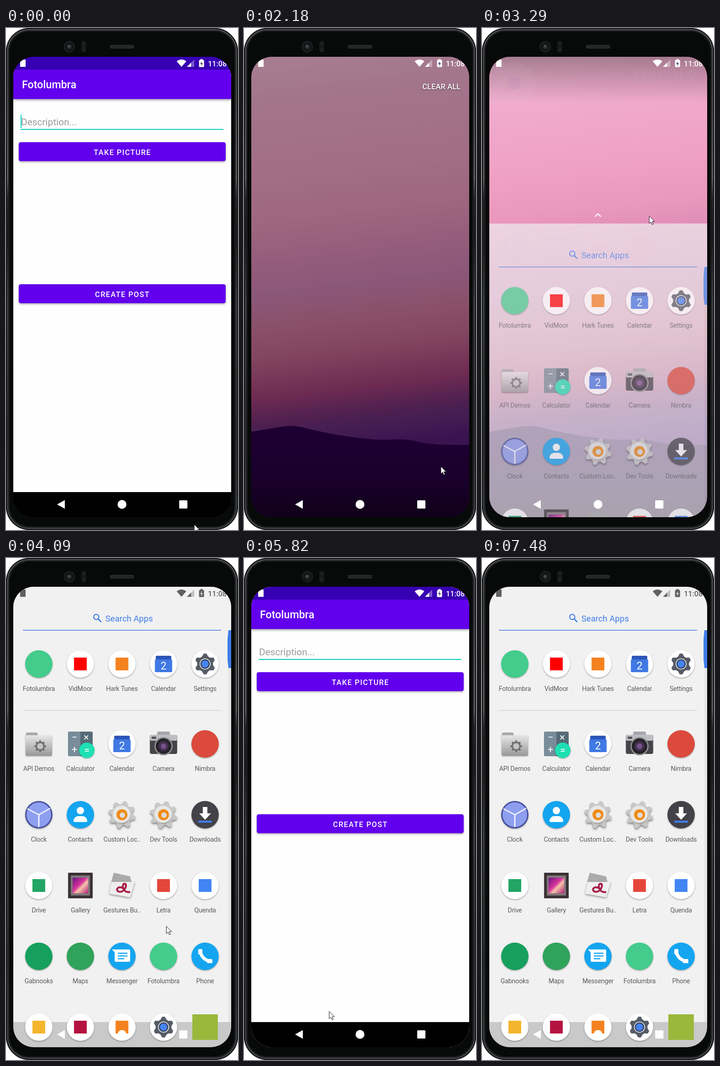
Recreate the animation shown at these times as an HTML page with a canvas. Size 509x1099 px, loop 7950 ms.

```html
<!DOCTYPE html>
<html lang="en">
<head>
<meta charset="utf-8">
<title>Phone walkthrough</title>
<style>
html, body { margin: 0; width: 100%; height: 100%; overflow: hidden; background: #fff; }
canvas { display: block; width: 509px; height: 1099px; }
</style>
</head>
<body>
<canvas id="stage" width="509" height="1099"></canvas>
<script>
const W = 509, H = 1099, LOOP = 7950, TAU = Math.PI * 2;
const APP = 'Fotolumbra';
const VIOLET = '#6200ee', BLUE = '#3f7de8', SKY = '#14a5f0', GREEN = '#43cc8c';
const REST = 831; // distance the app drawer travels

let g = document.getElementById('stage').getContext('2d');
const buffer = document.createElement('canvas');
buffer.width = W; buffer.height = H;
const bufferCtx = buffer.getContext('2d');

// ---- helpers ----
const ramp = (t, a, b) => Math.min(1, Math.max(0, (t - a) / (b - a)));
const ease = (t, a, b) => { const u = ramp(t, a, b); return u * u * (3 - 2 * u); };
const mix = (a, b, u) => a + (b - a) * u;

function track(t, keys, i = 1) {
  let n = 1;
  while (n < keys.length - 1 && t > keys[n][0]) n++;
  const a = keys[n - 1], b = keys[n];
  return mix(a[i], b[i], ramp(t, a[0], b[0]));
}
function rect(x, y, w, h, fill, r = 0) {
  g.fillStyle = fill;
  g.beginPath();
  g.roundRect(x, y, w, h, r);
  g.fill();
}
function disc(x, y, r, fill) {
  g.fillStyle = fill;
  g.beginPath();
  g.arc(x, y, r, 0, TAU);
  g.fill();
}
function line(points, color, width) {
  g.strokeStyle = color;
  g.lineWidth = width;
  g.beginPath();
  points.forEach(p => g.lineTo(...p));
  g.stroke();
}
function poly(points, fill) {
  g.fillStyle = fill;
  g.beginPath();
  points.forEach(p => g.lineTo(...p));
  g.closePath();
  g.fill();
}
function text(s, x, y, size, color, { weight = 400, align = 'left', space = 0 } = {}) {
  g.font = `${weight} ${size}px Roboto, sans-serif`;
  g.letterSpacing = space + 'px';
  g.textAlign = align;
  g.fillStyle = color;
  g.fillText(s, x, y);
}
function gradient(x0, y0, x1, y1, stops) {
  const fill = g.createLinearGradient(x0, y0, x1, y1);
  stops.forEach(([at, color]) => fill.addColorStop(at, color));
  return fill;
}
function at(x, y, draw) {
  g.save();
  g.translate(x, y);
  draw();
  g.restore();
}
function layer(alpha, draw) {
  if (alpha <= 0) return;
  if (alpha >= 1) return draw();
  const main = g;
  g = bufferCtx;
  g.clearRect(0, 0, W, H);
  draw();
  g = main;
  g.globalAlpha = alpha;
  g.drawImage(buffer, 0, 0);
  g.globalAlpha = 1;
}
function raised(dy, blur, alpha, draw) {
  g.save();
  g.shadowColor = `rgba(0,0,0,${alpha})`;
  g.shadowBlur = blur;
  g.shadowOffsetY = dy;
  draw();
  g.restore();
}

// ---- phone ----
function phone() {
  g.fillStyle = '#fff';
  g.fillRect(0, 0, W, H);
  rect(0, 0, W, H, '#080909', 51);
  const rim = gradient(0, 0, 0, H, [[0, '#626466'], [.1, '#55585a'], [.3, '#808284'],
    [.34, '#2a2c2d'], [.42, '#191b1c'], [.55, '#55585a'], [.8, '#34373a'], [1, '#55585a']]);
  [[1.5, 3, '#1b1d1e'], [3.8, 1.8, rim], [6.5, 2.5, '#1d1f20']].forEach(([d, w, color]) => {
    g.strokeStyle = color;
    g.lineWidth = w;
    g.beginPath();
    g.roundRect(d, d, W - 2 * d, H - 2 * d, 51 - d);
    g.stroke();
  });
  disc(139, 41, 12.5, '#1e1f20');
  disc(139, 41, 10, '#131415');
  disc(139, 41, 5, '#2c2e30');
  disc(138, 40, 2, '#5a5d60');
  rect(165, 28, 11, 26, '#171819', 5);
  disc(170.5, 34, 4, '#1e1f20');
  disc(170.5, 47, 4, '#1e1f20');
  rect(228, 37, 53, 8, '#2d2e2f', 4);
  for (let x = 232; x < 279; x += 3) rect(x, 38.5, 1.2, 5, '#161717');
}

function statusIcons(color) {
  poly([[34, 69], [43, 69], [43, 85], [31, 85], [31, 72]], color);
  g.fillStyle = color;
  g.beginPath();
  g.moveTo(385, 85);
  g.lineTo(374.5, 73);
  g.quadraticCurveTo(385, 65, 395.5, 73);
  g.fill();
  g.globalAlpha = .35;
  poly([[413, 69], [413, 85], [397, 85]], color);
  g.globalAlpha = 1;
  poly([[406, 76], [406, 85], [397, 85]], color);
  rect(423.5, 70, 11, 15.5, color, 1.5);
  rect(426.5, 68, 5, 3, color);
  poly([[430, 72], [426, 79], [429, 79], [428, 84], [432, 77], [429, 77]], color === '#fff' ? '#463070' : '#ddd');
  text('11:08', 443, 83.5, 16.3, color, { weight: 500 });
}

function navButtons() {
  poly([[112, 1043], [129, 1033.5], [129, 1052.5]], '#fff');
  disc(254.5, 1043, 9.7, '#fff');
  rect(380, 1034, 18, 18, '#fff', 1.5);
}

// ---- posting app ----
function button(label, y) {
  raised(2, 4, .35, () => rect(28, y, 454, 41.5, VIOLET, 4.5));
  text(label, 255.5, y + 27.5, 16.3, '#fff', { weight: 500, align: 'center', space: 1.45 });
}
function appBody(caret) {
  raised(2, 5, .35, () => rect(16, 91, 478, 64.5, VIOLET));
  text(APP, 35, 132, 23.3, '#fff', { weight: 500 });
  text('Description...', 33, 213, 20.9, '#9b9b9b');
  rect(32, 221, 445, 2, '#03d0bd');
  if (caret) rect(32, 190, 2, 29, '#03d0bd');
  button('TAKE PICTURE', 250);
  button('CREATE POST', 561);
}
function appWindow(bottom = 1016) {
  rect(16, 91, 478, bottom - 91, '#fefefe');
  rect(16, 63, 478, 28, '#3700b3');
}

// ---- wallpaper, home and recents ----
function wallpaper() {
  g.fillStyle = gradient(205, 70, 305, 913, [[0, '#f4b6d4'], [.08, '#f0acce'], [.27, '#efa1c4'],
    [.39, '#ea97bc'], [.5, '#da88b5'], [.58, '#cd80b2'], [.67, '#cb7599'], [.74, '#c0668d'],
    [.84, '#a34079'], [.91, '#742f76'], [.95, '#632b79'], [1, '#551d76']]);
  g.fillRect(16, 63, 478, 1008);
  const ridge = [[16, 884], [62, 876], [110, 869], [150, 880], [220, 894], [300, 903], [355, 899], [405, 912], [494, 913]];
  g.fillStyle = gradient(0, 870, 0, 1071, [[0, '#2c004a'], [.6, '#260040'], [1, '#170024']]);
  g.beginPath();
  g.moveTo(...ridge[0]);
  for (let i = 1; i < ridge.length - 1; i++) {
    const [x, y] = ridge[i], [nx, ny] = ridge[i + 1];
    g.quadraticCurveTo(x, y, (x + nx) / 2, (y + ny) / 2);
  }
  g.lineTo(494, 913);
  g.lineTo(494, 1071);
  g.lineTo(16, 1071);
  g.fill();
}

function home(top) {
  rect(16, 76, 101, 92, '#f4f4f4', [0, 46, 46, 0]);
  disc(71, 122, 14, BLUE);
  text('March 2', 474, 120, 40, '#fff', { align: 'right' });
  [phoneIcon, chatIcon, mark('#e5463a'), plain('#db4a3c')].forEach((icon, i) =>
    at(72 + 91.2 * i, top + 56, icon));
}

function card(k, header, dx) {
  const s = mix(1, .9226, k), top = mix(63, 91, k), bottom = mix(1016, 894, k);
  g.save();
  g.translate(19.3 * k + dx, 107 * k);
  g.scale(s, s);
  raised(4, 26, .55, () => rect(16, top, 478, bottom - top, '#fefefe'));
  g.beginPath();
  g.rect(16, top, 478, bottom - top);
  g.clip();
  appWindow();
  appBody(k === 0);
  g.restore();
  g.globalAlpha *= header;
  rect(34 + dx, 191, 441, 65, VIOLET);
  disc(69 + dx, 224, 15, GREEN);
  text(APP, 99 + dx, 231.5, 18.6, '#fff');
  g.globalAlpha = 1;
}

// ---- launcher icons, drawn around the origin ----
const plate = color => raised(1.5, 3, .35, () => disc(0, 0, 30, color));
const plain = color => () => plate(color);
const mark = color => () => { plate('#fff'); rect(-14, -14, 28, 28, color); };

function gear(r, teeth, color, hole) {
  g.fillStyle = color;
  g.beginPath();
  for (let i = 0; i < teeth * 4; i++) {
    const a = (i - .5) / (teeth * 4) * TAU, d = i % 4 < 2 ? r : r * .76;
    g.lineTo(Math.cos(a) * d, Math.sin(a) * d);
  }
  g.fill();
  disc(0, 0, r * .52, hole);
}
function settings() {
  plate('#fff');
  g.save();
  g.rotate(TAU / 12);
  gear(23, 6, '#555c66', '#fff');
  g.restore();
  disc(0, 0, 10.5, '#2e3c55');
  disc(0, 0, 8, '#4683f0');
}
function calendar() {
  plate('#fff');
  rect(-17, -18, 34, 12, '#2c55b8', 2);
  rect(-19, -10, 38, 28, '#4079e4', 2);
  text('2', 0, 11.5, 23, '#fff', { align: 'center' });
}
function folder() {
  raised(2, 3, .4, () => {
    rect(-28, -25, 25, 12, '#aaa', 3);
    rect(-29, -19, 58, 44, gradient(0, -19, 0, 25, [[0, '#e6e6e6'], [1, '#9a9a9a']]), 3);
  });
  at(3, 5, () => gear(13, 8, '#707070', '#c4c4c4'));
}
function calculator() {
  rect(-27, -27, 54, 54, '#566b77', 3);
  rect(-27, -27, 27, 54, '#788d99', [3, 0, 0, 3]);
  raised(1, 3, .4, () => disc(14, 14, 17, '#1fe0b3'));
  [['−', -13, -7], ['×', 13, -7], ['+', -13, 20], ['=', 14, 21]].forEach(([s, x, y]) =>
    text(s, x, y, 22, '#fff', { align: 'center' }));
}
function camera() {
  rect(-14, -27, 28, 14, '#a5a6aa', 3);
  rect(-30, -20, 60, 42, '#454549', 4);
  rect(-30, -20, 60, 13, '#bdbec1', 3);
  rect(-26, -16, 10, 5, '#555');
  [[20, '#8b8c90'], [17, '#252328'], [11, '#443050'], [6, '#77528a']].forEach(([r, c]) => disc(0, 5, r, c));
}
function clock() {
  plate('#46519f');
  disc(0, 0, 27, '#8f9ff0');
  [[-25, -13], [25, -14], [0, 27]].forEach(p => line([[0, 0], p], '#fff', 2.5));
}
function contacts() {
  plate(SKY);
  disc(0, -9, 8, '#fff');
  rect(-15, 3, 30, 13, '#fff', [11, 11, 2, 2]);
}
function tool() {
  g.save();
  g.rotate(.25);
  raised(3, 4, .45, () => gear(30, 8, '#c9c8c6', '#aaa'));
  g.restore();
  disc(-1, -1, 19, '#e8e7e5');
  disc(0, 0, 12, '#f08a13');
  disc(1, 1, 6, '#ddd');
}
function downloads() {
  plate('#434248');
  rect(-5, -17, 10, 15, '#fff');
  poly([[-13, -3], [13, -3], [0, 11]], '#fff');
  rect(-15, 13, 30, 4.5, BLUE);
}
function gallery() {
  rect(-27, -28, 54, 56, '#3a3135', 1);
  rect(-21, -22, 42, 44, '#81777b');
  rect(-17, -17, 34, 34, gradient(-17, -17, 17, 17, [[0, '#6b1482'], [.45, '#d9349c'], [.6, '#f4c4a8'], [1, '#b21c78']]));
}
function gestures() {
  poly([[-18, -28], [18, -20], [22, -3], [-24, -7]], '#aaa');
  raised(2, 4, .4, () => poly([[-23, -8], [28, -8], [18, 26], [-28, 18]], '#eee'));
  g.strokeStyle = '#a51a43';
  g.lineWidth = 4;
  g.beginPath();
  g.moveTo(18, 14);
  g.bezierCurveTo(2, 18, -2, -4, 6, -4);
  g.bezierCurveTo(14, -2, 4, 18, -8, 13);
  g.bezierCurveTo(-16, 8, -6, 0, 2, 6);
  g.stroke();
}
function chatIcon() {
  plate(SKY);
  rect(-16, -15, 34, 27, '#fff', 3);
  poly([[-22, -15], [-10, -15], [-10, -3]], '#fff');
  [-8, -2, 4].forEach((y, i) => rect(-9, y, i === 2 ? 14 : 21, 2.5, SKY));
}
function phoneIcon() {
  plate(SKY);
  g.strokeStyle = '#fff';
  g.lineWidth = 7;
  g.beginPath();
  g.moveTo(-11, -13);
  g.quadraticCurveTo(-8, 8, 13, 11);
  g.stroke();
  rect(-15, -16, 9, 12, '#fff', 2);
  rect(4, 6, 12, 9, '#fff', 2);
}

const ROWS = [
  [232, [[APP, plain(GREEN)], ['VidMoor', mark('#f00')], ['Hark Tunes', mark('#f58220')], ['Calendar', calendar], ['Settings', settings]]],
  [407, [['API Demos', folder], ['Calculator', calculator], ['Calendar', calendar], ['Camera', camera], ['Nimbra', plain('#db4a3c')]]],
  [562, [['Clock', clock], ['Contacts', contacts], ['Custom Loc..', tool], ['Dev Tools', tool], ['Downloads', downloads]]],
  [717, [['Drive', mark('#22a565')], ['Gallery', gallery], ['Gestures Bu..', gestures], ['Letra', mark('#e5463a')], ['Quenda', mark('#4285f4')]]],
  [872, [['Gabnooks', plain('#16a05d')], ['Maps', plain('#30a35b')], ['Messenger', chatIcon], [APP, plain(GREEN)], ['Phone', phoneIcon]]],
  [1027, [['', mark('#f4b52c')], ['', mark('#b5133f')], ['', mark('#f58220')], ['', settings], ['', () => rect(-28, -28, 56, 56, '#9ab83c')]]],
];

function drawerPanel(shift) {
  rect(16, 63 + shift, 478, 1008, '#f1f1f1');
  rect(488, 158 + shift, 6, 858, '#e5e5e5');
  if (shift < 60) rect(16, 1016, 478, 55, `rgba(0,0,0,${.17 * (1 - shift / 60)})`);
}
function drawerApps(shift) {
  at(0, shift, () => {
    g.strokeStyle = BLUE;
    g.lineWidth = 2.2;
    g.beginPath();
    g.arc(198, 129, 5.7, 0, TAU);
    g.stroke();
    line([[202, 133], [209, 140]], BLUE, 2.6);
    text('Search Apps', 218, 138.5, 18.6, BLUE);
    rect(37, 157.5, 435, 1.5, BLUE);
    rect(37, 333, 435, 1.2, '#cfcfcf');
    poly([[488, 158], [494, 158], [494, 241], [488, 241], [486, 222], [486, 178]], BLUE);
    ROWS.forEach(([y, apps]) => apps.forEach(([label, icon], i) => {
      const x = 72 + 91.2 * i;
      at(x, y, icon);
      text(label, x, y + 58.5, 14.2, '#5c5c5c', { align: 'center', space: -.2 });
    }));
  });
}
function drawer(shift, alpha = 1) {
  layer(alpha, () => drawerPanel(shift));
  layer(alpha, () => drawerApps(shift));
}

// ---- timeline ----
const POINTER = [[0, 413, 1087], [70, 413, 1087], [330, 388, 1045], [760, 388, 1045], [995, 377, 992],
  [1260, 223, 690], [1340, 223, 690], [1700, 498, 685], [2010, 498, 685], [2070, 497, 822], [2180, 432, 960],
  [2400, 256, 1043], [2640, 254, 1043], [2960, 361, 880], [3286, 367, 412], [3400, 371, 330], [3520, 371, 400],
  [3640, 371, 534], [3900, 366, 750], [4250, 338, 862], [4410, 340, 873], [5150, 340, 873], [5420, 306, 900],
  [5800, 190, 990], [6150, 112, 1056], [6880, 112, 1056], [7000, 145, 1081], [7250, 345, 1089], [7400, 437, 1092], [7470, 440, 1104]];
const DRAWER = [[2960, REST], [3286, 365], [3400, 240], [3500, 90], [3610, 0]];

function pointer(t) {
  at(track(t, POINTER), track(t, POINTER, 2), () => {
    g.lineJoin = 'round';
    const arrow = [[0, 0], [0, 16], [3.8, 12.6], [6.5, 18.5], [9, 17.4], [6.4, 11.6], [11.4, 11.4]];
    poly(arrow, '#fff');
    line([...arrow, arrow[0]], '#15151f', 1);
  });
}

function recentsAndHome(t) {
  const k = ease(t, 440, 800), leave = ease(t, 2440, 2740);
  const shift = track(t, DRAWER), p = 1 - shift / REST, top = 63 + shift;
  wallpaper();
  rect(16, 63, 478, 1008, `rgba(0,0,0,${.32 * (1 - leave)})`);
  if (leave > 0) {
    rect(16, 63, 478, 100, gradient(0, 63, 0, 163,
      [[0, `rgba(0,0,0,${.32 * leave})`], [1, 'rgba(0,0,0,0)']]));
  }
  layer(k * (1 - leave), () => raised(1, 3, .6, () =>
    text('CLEAR ALL', 475, 134, 16.6, '#fff', { weight: 500, align: 'right' })));
  const dx = 275 * ramp(t, 1340, 1700);
  if (t < 1750) layer(1 - dx / 420, () => card(k, .45 * ramp(t, 860, 995) + .55 * ramp(t, 995, 1150), dx));
  layer(leave * (1 - 1.72 * p), () => home(top));
  layer(leave * Math.min(1, (1 - p) * 3), () =>
    line([[248, top - 15], [254.5, top - 21], [261, top - 15]], '#fff', 2.2));
  drawer(shift, Math.min(1, p * 1.2));
  if (k < 1) rect(16, 1016, 478, 55, `rgba(0,0,0,${1 - k})`);
  statusIcons(p > .9 ? '#616161' : '#fff');
}

function launchAndUse(t) {
  const u = ease(t, 4560, 4800);
  drawer(0);
  if (u < 1) statusIcons('#616161');
  g.save();
  g.beginPath();
  g.rect(mix(345, 16, u), mix(872, 63, u), 478 * u, 1008 * u);
  g.clip();
  appWindow();
  rect(16, 1016, 478, 55, '#000');
  layer(ramp(t, 4850, 5030), () => appBody(t < 5400 || t > 5900));
  statusIcons('#fff');
  g.restore();
}

function closeApp(t) {
  const u = Math.max(0, (t - 6325) / 200);
  drawer(0);
  statusIcons(t < 6600 ? '#b0b0b0' : '#616161');
  layer(1 - ramp(t, 6530, 6680), () => at(0, 147 * u * u, () => {
    appWindow(1400);
    appBody(true);
  }));
}

function screen(t) {
  if (t < 440) {
    appWindow();
    appBody(true);
    rect(16, 1016, 478, 55, '#000');
    statusIcons('#fff');
  } else if (t < 4550) recentsAndHome(t);
  else if (t < 6340) launchAndUse(t);
  else closeApp(t);
  navButtons();
}

function frame(now) {
  const raw = now % LOOP;
  const t = raw < 70 ? 0 : 47 + 79 * Math.floor((raw - 47) / 79);
  phone();
  g.save();
  g.beginPath();
  g.roundRect(16, 63, 478, 1008, 45);
  g.clip();
  screen(t);
  g.restore();
  pointer(t);
  requestAnimationFrame(() => frame(performance.now() - start));
}
const start = performance.now();
frame(0);
</script>
</body>
</html>
```
